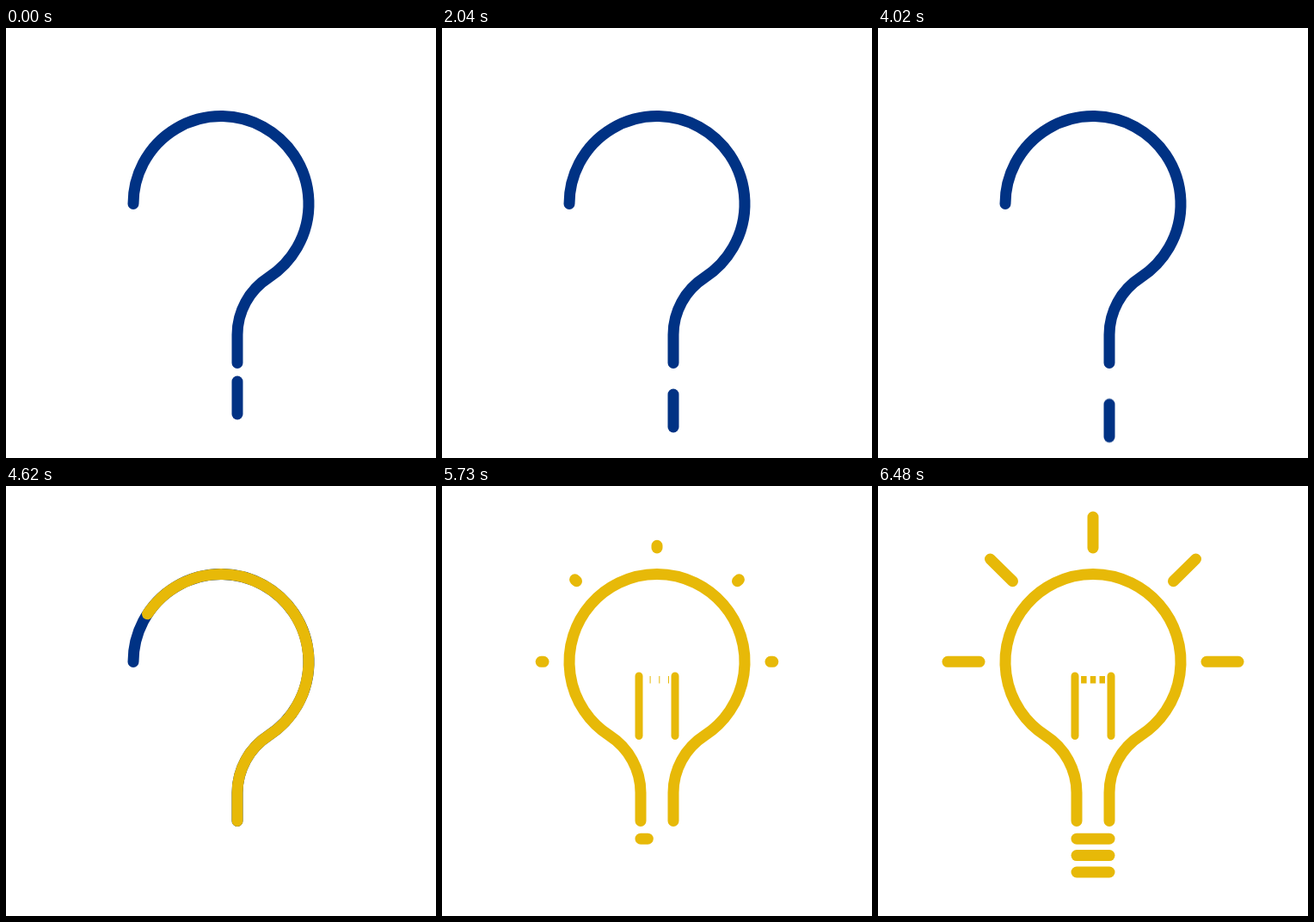
An HTML page without scripts that plays this animation: 500 by 500 pixels, repeating every 8 s.

```html
<!DOCTYPE html>
<html lang="en">
<head>
<meta charset="utf-8">
<title>Question to idea</title>
<style>
  html, body { margin: 0; width: 100%; height: 100%; overflow: hidden; background: #fff; }
  svg { display: block; width: 100%; height: 100%; }
  path { fill: none; stroke-width: 13; stroke-linecap: round; stroke-linejoin: round; }
  .question { stroke: #003284; }
  .bulb { stroke: #e7b908; }

  /* One loop is 8 s, so 1% is 80 ms. */
  .question, .bulb, .bulb path, .dot { animation: 8s linear infinite both; }
  .question { animation-name: leave; }
  .bulb { animation-name: enter; }
  .dot { animation-name: bounce; }

  .line { stroke-dasharray: 1 2; }
  .bulb .glass { animation-name: glass; }
  .bulb .post { animation-name: post; stroke-width: 9; }
  .bulb .ray { animation-name: ray; }
  .bulb .thread { animation-name: thread; animation-delay: calc(var(--i) * .27s); }
  .bulb .coil { animation-name: coil; stroke-width: 8.5; stroke-linecap: butt; }

  @keyframes leave {
    0%, 59.6% { visibility: visible; }
    59.61%, 100% { visibility: hidden; }
  }
  @keyframes enter {
    0%, 51.37% { visibility: hidden; }
    51.38%, 100% { visibility: visible; }
  }
  /* Two bounces, then the dash is pulled up into the stem. */
  @keyframes bounce {
    0%, 22.5%, 45% { transform: none; animation-timing-function: ease-in-out; }
    5.625%, 28.125% { transform: translateY(26.7px); animation-timing-function: ease-in-out; }
    11.25%, 33.75% { transform: none; }
    50.625% { transform: translateY(26.7px); animation-timing-function: cubic-bezier(.3, .5, .6, 1); }
    55.4% { transform: translateY(-60px); visibility: visible; }
    55.41%, 100% { transform: translateY(-60px); visibility: hidden; }
  }
  @keyframes glass {
    0%, 51.375% { stroke-dashoffset: 1.01; animation-timing-function: cubic-bezier(.333, .833, .667, 1); }
    70.125%, 100% { stroke-dashoffset: 0; }
  }
  @keyframes post {
    0%, 66% { stroke-dashoffset: 1.01; animation-timing-function: ease-out; }
    70.125%, 100% { stroke-dashoffset: 0; }
  }
  @keyframes ray {
    0%, 71.25% { stroke-dashoffset: 1.01; }
    75.875%, 100% { stroke-dashoffset: 0; }
  }
  @keyframes thread {
    0%, 70.875% { stroke-dashoffset: 1.01; }
    74.25%, 100% { stroke-dashoffset: 0; }
  }
  @keyframes coil {
    0%, 70.875% { stroke-dasharray: 0 10.7; }
    75.875%, 100% { stroke-dasharray: 6.5 4.2; }
  }
</style>
</head>
<body>
<svg viewBox="0 0 500 500">
  <g class="question">
    <path d="M269 389.5V356.5A79 79 0 0 1 305.2 290.3A102 102 0 1 0 148 204.5"/>
    <path class="dot" d="M269 411V449"/>
  </g>
  <g class="bulb">
    <path class="line glass" pathLength="1" d="M269 389.5V356.5A79 79 0 0 1 305.2 290.3A102 102 0 1 0 194.8 290.3A79 79 0 0 1 231 356.5V389.5"/>

    <path class="line post" pathLength="1" d="M229 290.5V221"/>
    <path class="line post" pathLength="1" d="M271 290.5V221"/>
    <path class="coil" d="M264 225.3H235"/>

    <path class="line ray" pathLength="1" d="M118 204.3H81"/>
    <path class="line ray" pathLength="1" d="M156.5 110.7L130.5 85"/>
    <path class="line ray" pathLength="1" d="M250 72V36"/>
    <path class="line ray" pathLength="1" d="M343.5 110.7L369.5 85"/>
    <path class="line ray" pathLength="1" d="M382 204.3H419"/>

    <path class="line thread" style="--i:0" pathLength="1" d="M231 410.2H269"/>
    <path class="line thread" style="--i:1" pathLength="1" d="M231 429.6H269"/>
    <path class="line thread" style="--i:2" pathLength="1" d="M231 449H269"/>
  </g>
</svg>
</body>
</html>
```
